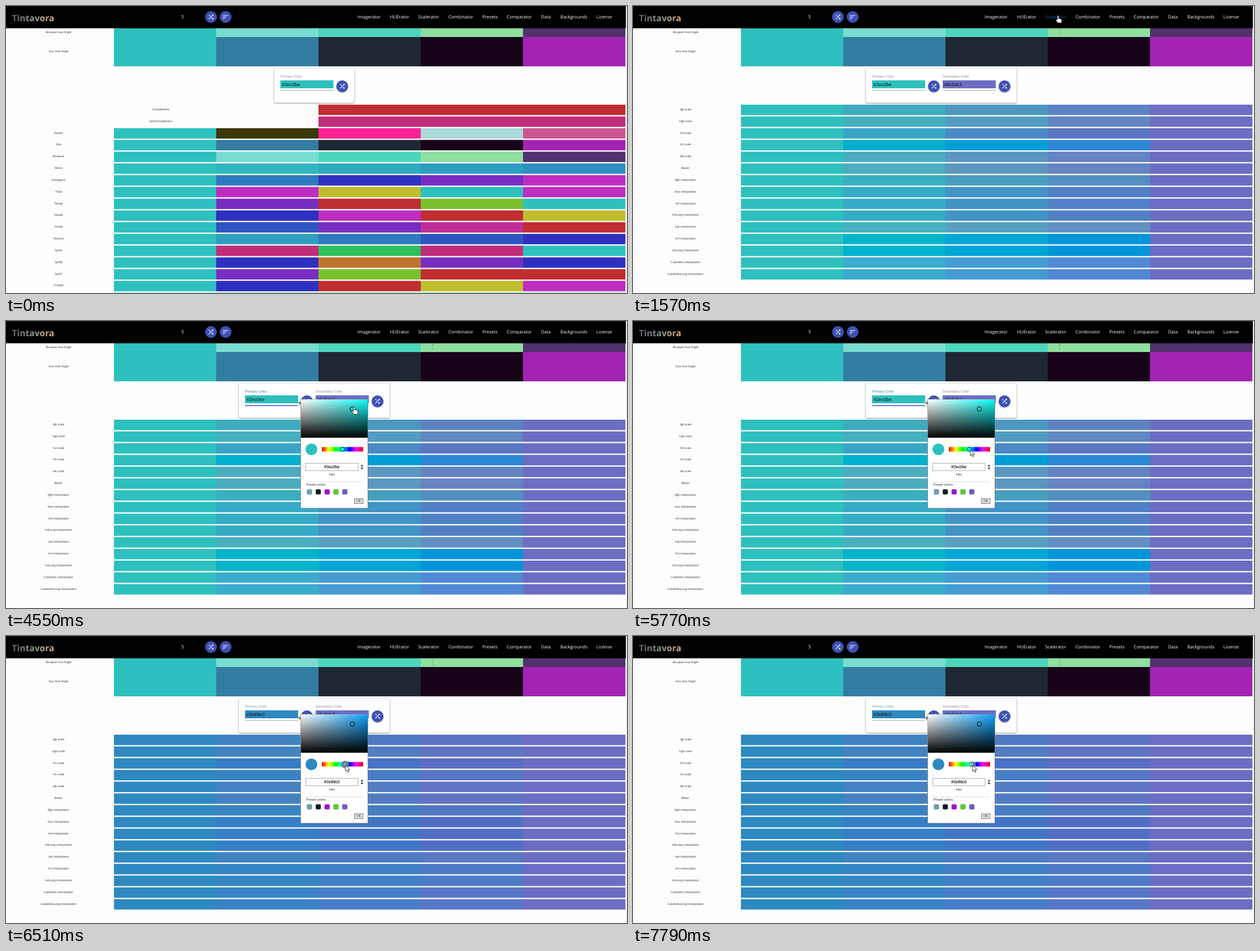
These frames come from a looping animation (1099x509 px, 8000 ms). An HTML page:

```html
<!DOCTYPE html>
<html lang="en">
<head>
<meta charset="utf-8">
<title>Palette scales</title>
<style>
html, body { margin: 0; width: 100%; height: 100%; overflow: hidden; background: #fdfdfd; }
svg { display: block; position: absolute; left: 0; top: 0; }
text { dominant-baseline: central; text-rendering: geometricPrecision; }
.ui { font-family: "Open Sans", "Noto Sans", sans-serif; }
.form { font-family: "Liberation Sans", Arial, sans-serif; }
.mid { text-anchor: middle; }
.raised { filter: drop-shadow(0 1px 1px #0006); }
</style>
</head>
<body>
<svg id="stage" width="1099" height="509"></svg>
<svg id="pointer" width="1099" height="509"><g></g></svg>
<script>
const TEAL = '#2ec0be', BLUE = '#2e89c0', VIOLET = '#6c6dc3';
const HSL = { [TEAL]: [179, 61, 46.7], [BLUE]: [202.6, 61, 46.7], [VIOLET]: [239.3, 42, 59.4] };
const LOOP = 8000, STEP = 69;

// Colour mixing
const rgb = hex => [1, 3, 5].map(i => parseInt(hex.slice(i, i + 2), 16));
const lerp = (a, b, t) => a.map((v, i) => v + (b[i] - v) * t);
const css = c => `rgb(${c.map(v => Math.round(Math.max(0, Math.min(255, v))))})`;
const hsl = ([h, s, l]) => `hsl(${h},${s}%,${l}%)`;
const linear = v => (v /= 255) <= .04045 ? v / 12.92 : ((v + .055) / 1.055) ** 2.4;
const gamma = v => 255 * (v <= .0031308 ? 12.92 * v : 1.055 * v ** (1 / 2.4) - .055);

function toLab(c) {
  const [r, g, b] = c.map(linear);
  const f = v => v > .008856 ? Math.cbrt(v) : 7.787 * v + 4 / 29;
  const x = f((.4125 * r + .3576 * g + .1804 * b) / .9505);
  const y = f(.2127 * r + .7152 * g + .0722 * b);
  const z = f((.0193 * r + .1192 * g + .9503 * b) / 1.0888);
  return [116 * y - 16, 500 * (x - y), 200 * (y - z)];
}
function fromLab([l, a, b]) {
  const f = v => v > 6 / 29 ? v ** 3 : (v - 4 / 29) / 7.787;
  const m = (l + 16) / 116;
  const x = .9505 * f(m + a / 500), y = f(m), z = 1.0888 * f(m - b / 200);
  return [3.2405 * x - 1.5371 * y - .4985 * z,
          -.9693 * x + 1.876 * y + .0416 * z,
          .0556 * x - .204 * y + 1.0572 * z].map(gamma);
}
const toLch = ([l, a, b]) => [l, Math.hypot(a, b), (Math.atan2(b, a) + 2 * Math.PI) % (2 * Math.PI)];
const fromLch = ([l, c, h]) => [l, c * Math.cos(h), c * Math.sin(h)];
const HELIX = {
  [TEAL]: ['#3aaccd', '#449cd3', '#5189d4'],
  [BLUE]: ['#3a83c6', '#487dc9', '#5877c8']
};
const mixers = {
  rgb: (a, b, t) => css(lerp(rgb(a), rgb(b), t)),
  lrgb: (a, b, t) => css(lerp(rgb(a).map(v => v * v), rgb(b).map(v => v * v), t).map(Math.sqrt)),
  hsl: (a, b, t) => hsl(lerp(HSL[a], HSL[b], t)),
  lab: (a, b, t) => css(fromLab(lerp(toLab(rgb(a)), toLab(rgb(b)), t))),
  lch: (a, b, t) => css(fromLab(fromLch(lerp(toLch(toLab(rgb(a))), toLch(toLab(rgb(b))), t)))),
  helix: (a, b, t) => HELIX[a][Math.round(t * 5) - 1]
};

// Drawing helpers
const rect = (x, y, w, h, fill, more = '') =>
  `<rect x="${x}" y="${y}" width="${w}" height="${h}" fill="${fill}" ${more}/>`;
const circle = (x, y, r, fill, more = '') => `<circle cx="${x}" cy="${y}" r="${r}" fill="${fill}" ${more}/>`;
const text = (s, x, y, size, fill, cls, more = '') =>
  `<text x="${x}" y="${y}" font-size="${size}" fill="${fill}" class="${cls}" ${more}>${s}</text>`;
const cells = (colors, y, h) => colors.map((c, i) => rect(191 + 181 * i, y, 181.2, h, c)).join('');
const label = (s, y, x = 93) => text(s, x, y, 5, '#222', 'ui mid');

const SHUFFLE = 'M10.59 9.17L5.41 4 4 5.41l5.17 5.17 1.42-1.41zM14.5 4l2.04 2.04L4 18.59 5.41 20 17.96 7.46 20 9.5V4h-5.5zm.33 9.41l-1.41 1.41 3.13 3.13L14.5 20H20v-5.5l-2.04 2.04-3.13-3.13z';
const SORT = 'M3 18h6v-2H3v2zM3 6v2h18V6H3zm0 7h12v-2H3v2z';
const button = (x, y, icon) => circle(x, y, 10.4, '#3f51b5', 'class="raised"') +
  `<path d="${icon}" fill="#fff" transform="translate(${x - 6.4} ${y - 6.4}) scale(.53)"/>`;

const FLOWER = ['#3b3806', '#ff2193', '#aadbda', '#cb568f'];
const DUO = ['#327da1', '#1f2733', '#18031b', '#a323b3'];
const BOUQUET = ['#78ddd0', '#4dd6bd', '#8fdf9f', '#52326d'];
const harmonies = [
  ['Flower', FLOWER], ['Duo', DUO], ['Bouquet', BOUQUET],
  ['Mono', [184, 189, 194, 200]], ['Analogous', [209, 239, 270, 299]],
  ['Triad', [299, 59, 179, 299]], ['Tetrad', [270, 359, 89, 179]],
  ['Hexad', [239, 299, 359, 59]], ['Octad', [224, 270, 316, 359]],
  ['Neutral', [194, 209, 224, 239]], ['SplitA', [329, 140, 329, 179]],
  ['SplitB', [239, 29, 270, 239]], ['SplitC', [270, 89, 359, 359]],
  ['Tone4A', [239, 359, 59, 299]], ['', [140, 140, 140, 140]]
];
const scales = [
  ['rgb scale', 'rgb'], ['lrgb scale', 'lrgb'], ['hsl scale', 'hsl'], ['lch scale', 'lch'],
  ['lab scale', 'lab'], ['Bezier', 'lab'], ['Rgb interpolator', 'rgb'], ['Hue interpolator', 'hsl'],
  ['Hsl interpolator', 'hsl'], ['HslLong interpolator', 'hsl'], ['Lab interpolator', 'lab'],
  ['Hcl interpolator', 'lch'], ['HclLong interpolator', 'lch'],
  ['Cubehelix interpolator', 'helix'], ['CubehelixLong interpolator', 'helix']
];
const nav = [['Imagerator', 642.5], ['HUErator', 696.5], ['Scalerator', 748], ['Combinator', 805],
  ['Presets', 856.5], ['Comparator', 908.5], ['Data', 955.5], ['Backgrounds', 1005], ['License', 1058.5]];
const rowY = i => 175 + 20.83 * i;

function header(hover) {
  return rect(0, 0, 1097, 39.5, '#000') + rect(0, 0, 1097, 1, '#12221f') +
    `<linearGradient id="logo"><stop stop-color="#5a6070"/><stop offset=".5" stop-color="#8b9a8c"/>
     <stop offset="1" stop-color="#dcab80"/></linearGradient>` +
    text('Tintavora', 10.5, 20.5, 15.6, 'url(#logo)', 'ui', 'font-weight="700"') +
    text('5', 312.5, 19.5, 8, '#fff', 'ui mid') +
    button(362.7, 19.5, SHUFFLE) + button(388.7, 19.5, SORT) +
    nav.map(([s, x]) => text(s, x, 20, 7.9, hover && s === 'Scalerator' ? '#12589f' : '#fff',
      'ui mid', 'font-weight="500"')).join('');
}

function angles() {
  return cells([TEAL, ...BOUQUET], 39, 16) + cells([TEAL, ...DUO], 55, 52) +
    label('Bouquet Hue Angle', 47) + label('Duo Hue Angle', 81);
}

function harmonyRows() {
  return ['Complement', 'SplitComplement'].map((s, i) =>
    rect(553, rowY(i), 543.2, 18.5, hsl([359 - 30 * i, 61, 46.7])) + label(s, rowY(i) + 9, 274)).join('') +
    harmonies.map(([s, list], i) => {
      const y = rowY(i + 2);
      const colors = list.map(c => c.length ? c : hsl([c, 61, 46.7]));
      return cells([TEAL, ...colors], y, 18.5) + label(s, y + 9);
    }).join('');
}

function scaleRows(color) {
  return scales.map(([s, mode], i) => {
    const step = i < 6 ? .25 : .2;
    const inner = [1, 2, 3].map(n => mixers[mode](color, VIOLET, n * step));
    return cells([color, ...inner, VIOLET], rowY(i), 18.5) + label(s, rowY(i) + 9);
  }).join('');
}

function field(name, x, color, ink = '#8a8a8a', line = '#949494', weight = .8) {
  return text(name, x, 125, 6.3, ink, 'form') + rect(x, 131.8, 94, 14.2, color) +
    text(color, x + 2.5, 139.2, 8.4, '#111', 'form') +
    rect(x, 149.2, 94, weight, line) + button(x + 109.5, 142.4, SHUFFLE);
}

function card(page, color, focus) {
  const [x, w] = page ? [412, 267] : [474.5, 142];
  const look = focus ? ['#3a6fb0', '#3f51b5', 1.5] : color === BLUE ? ['#6d9a94'] : [];
  return rect(x, 110.5, w, 61, '#fff', 'rx="2" stroke="#ddd" stroke-width=".6" class="raised"') +
    field('Primary Color', x + 11, color, ...look) +
    (page ? field('Secondary Color', 548, VIOLET) : '');
}

function picker(color) {
  const hue = HSL[color][0];
  const rainbow = [0, 60, 120, 180, 240, 300, 360].map(h =>
    `<stop offset="${h / 360}" stop-color="hsl(${h},100%,50%)"/>`).join('');
  const ring = 'stroke="#111" stroke-width="1"';
  return `<path d="M521 142L517 145.500L521 149Z" fill="#777"/>
    <linearGradient id="sat"><stop stop-color="#fff"/><stop offset="1" stop-color="hsl(${hue},95%,51%)"/></linearGradient>
    <linearGradient id="val" x2="0" y2="1"><stop stop-opacity="0"/><stop offset="1"/></linearGradient>
    <linearGradient id="hue">${rainbow}</linearGradient>` +
    rect(521.4, 139, 119, 193, '#fff', 'stroke="#777" stroke-width=".8"') +
    rect(521.8, 139.3, 118.2, 67.7, 'url(#sat)') + rect(521.8, 139.3, 118.2, 67.7, 'url(#val)') +
    circle(613, 156, 4, 'none', ring) + circle(540.5, 227.7, 10.4, color) +
    rect(559, 223.5, 73, 8, 'url(#hue)') +
    circle(color === TEAL ? 595.5 : 599.5, 227.5, 4, 'none', ring) +
    rect(530.5, 252.3, 92.5, 13.2, '#fff', 'stroke="#999" stroke-width=".8"') +
    text(color, 576.8, 259.2, 7.1, '#111', 'form mid', 'stroke="#111" stroke-width=".15"') +
    text('Hex', 576.8, 273.3, 5.8, '#333', 'form mid') +
    '<path d="M627.700 258L630 254.500L632.300 258ZM627.700 260L630 263.500L632.300 260Z" fill="#333"/>' +
    rect(530, 285, 102, .8, '#d5d5d5') + text('Preset colors', 531.5, 290.8, 5.9, '#333', 'form') +
    ['#6f9fb5', '#0d1a1f', '#a30fd8', '#56cc29', '#6c5bc2'].map((c, i) =>
      rect(532.5 + 15.65 * i, 298.5, 9, 9, c, 'rx="2" stroke="#8888" stroke-width=".6"')).join('') +
    rect(616.8, 315.3, 15, 8.4, '#eee', 'stroke="#444" stroke-width=".8"') +
    text('OK', 624.3, 319.7, 6, '#111', 'form mid');
}

// Pointer: time, x, y, shape
const BEAM = 'M-2-5Q0-5 0-3.500V3.500Q0 5-2 5M2-5Q0-5 0-3.500M0 3.500Q0 5 2 5';
const shapes = {
  none: '',
  beam: `<path d="${BEAM}" fill="none" stroke="#666"/>`,
  arrow: '<path d="M0 0V11L2.600 8.600 4.200 12.800 6 12 4.300 8H7.800Z" fill="#fff" stroke="#111" stroke-width=".8"/>',
  hand: '<path d="M-1 1A1.200 1.200 0 0 1 1.400 1V5L5.800 6.200Q7 6.700 6.800 8.200L6 13H0L-4 8Q-3.800 6.200-2.200 7L-1 8Z" fill="#fff" stroke="#111" stroke-width=".8"/>'
};
const path = [
  [0, 1090, 490, 'none'], [130, 1085, 485, 'beam'], [300, 1040, 440, 'beam'], [760, 777, 85, 'beam'],
  [885, 754, 46, 'beam'], [955, 755, 29, 'hand'], [1024, 752, 18, 'hand'], [1200, 752, 18, 'hand'],
  [1280, 752, 17, 'hand'], [1980, 752, 17, 'hand'], [2020, 710, 34, 'arrow'], [2300, 411, 135, 'arrow'],
  [2480, 411, 135, 'arrow'], [2540, 425, 140, 'beam'], [2760, 491, 139, 'beam'], [3110, 491, 139, 'beam'],
  [3150, 474, 139, 'beam'], [3960, 474, 139, 'beam'], [4060, 478, 141, 'arrow'], [4200, 530, 152, 'arrow'],
  [4400, 604, 167, 'hand'], [4530, 616, 152.5, 'hand'], [5050, 616, 152.5, 'hand'],
  [5360, 610, 200, 'arrow'], [5700, 597, 228, 'arrow'], [5800, 597, 228, 'arrow'],
  [5840, 599, 228, 'arrow'], [6030, 600, 229, 'arrow'], [6440, 601, 229, 'arrow'], [LOOP, 601, 229, 'arrow']
];

function pointer(time) {
  const t = time < 130 ? 0 : 130 + Math.floor((time - 130) / STEP) * STEP;
  const i = path.findIndex(k => k[0] > t) - 1;
  const [a, b] = [path[i], path[i + 1]];
  const [x, y] = lerp(a.slice(1, 3), b.slice(1, 3), (t - a[0]) / (b[0] - a[0]));
  return { x, y, shape: a[3] };
}

const stage = document.getElementById('stage');
const tip = document.querySelector('#pointer g');
let shown = '', shape = '';

function draw(t) {
  const page = t >= 1570, open = t >= 3690, picked = t >= 5840;
  const hover = t >= 960 && t < 2030, trail = t >= 890;
  const halo = !picked ? '' : t < 6910 ? '#6f8585cc' : '#d8d47066';
  const state = [page, open, picked, hover, trail, halo].join();
  if (state !== shown) {
    shown = state;
    const color = picked ? BLUE : TEAL;
    stage.innerHTML = rect(0, 0, 1099, 509, '#fdfdfd') + rect(1097, 0, 2, 509, '#f1f1f1') +
      angles() + (page ? scaleRows(color) : harmonyRows()) + header(hover) +
      card(page, color, open && !picked) + (open ? picker(color) : '') +
      (trail ? `<path d="${BEAM}" transform="translate(755 46)" fill="none" stroke="#777" opacity=".45"/>` : '') +
      (halo ? circle(600, 228, 7, halo) + circle(600, 227.5, 2, '#fff5') : '');
  }
  const p = pointer(t);
  if (p.shape !== shape) tip.innerHTML = shapes[shape = p.shape];
  tip.setAttribute('transform', `translate(${p.x} ${p.y})`);
}

const start = performance.now();
function tick() {
  draw((performance.now() - start) % LOOP);
  requestAnimationFrame(tick);
}
tick();
</script>
</body>
</html>
```
